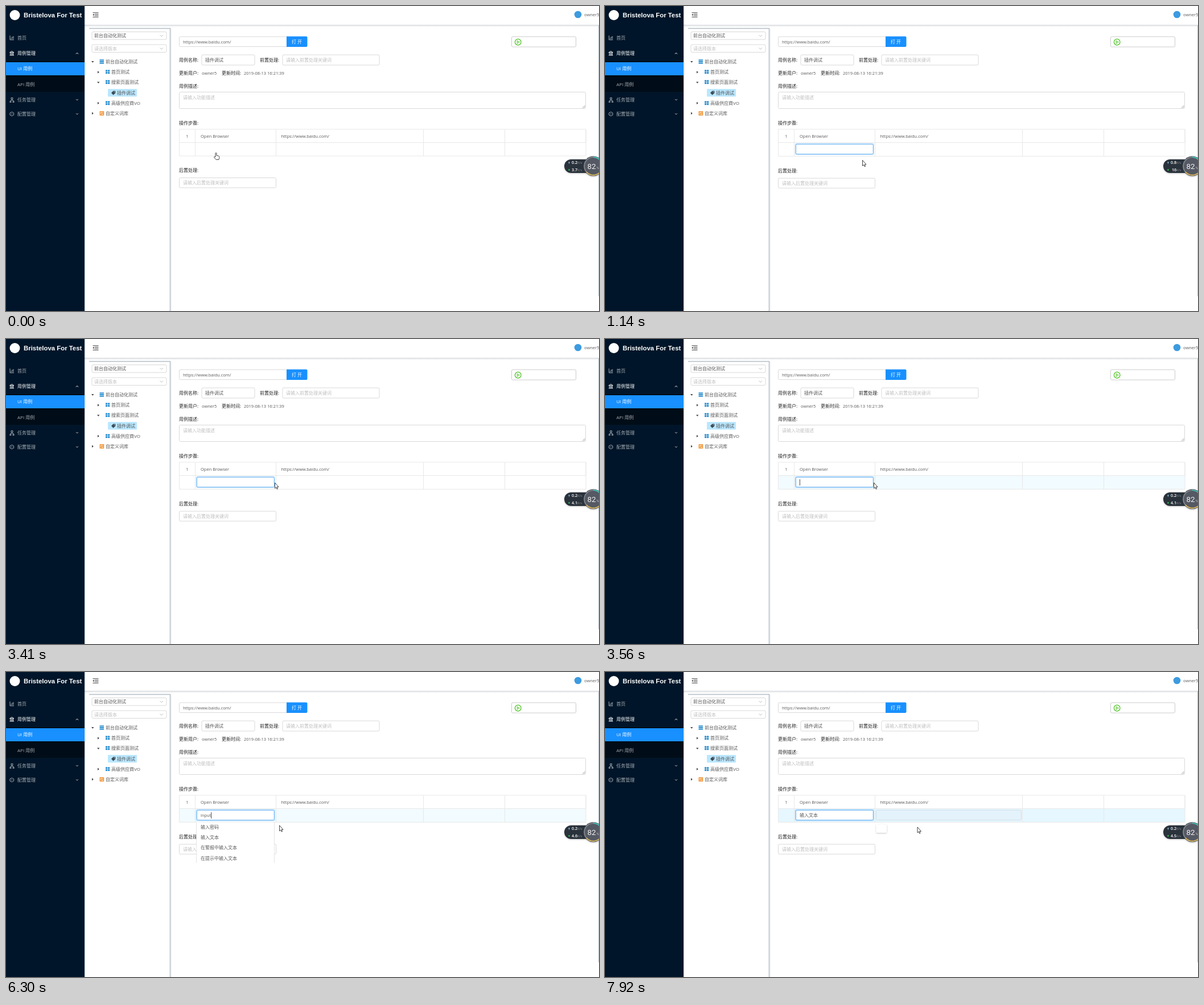
Animation, 1042 px wide and 537 px high, one loop 8000 ms. Source, as an HTML page:

```html
<!DOCTYPE html>
<html lang="zh">
<head>
<meta charset="utf-8">
<style>
html, body { margin: 0; width: 100%; height: 100%; overflow: hidden; background: #fff; }
svg { display: block; width: 100%; height: 100%; }
text { font: 8px "Open Sans", "Noto Sans CJK SC", "Noto Sans CJK", sans-serif; fill: #595959; white-space: pre; }
text.latin { font-size: 7.5px; }
text.label { fill: #262626; }
text.hint { fill: #bfbfbf; }
text.menu { fill: #a6adb4; }
text.lit { fill: #fff; }
text.strong { font-weight: 500; }
.box { fill: #fff; stroke: #d9d9d9; }
.grid { fill: none; stroke: #e8e8e8; }
.chevron { fill: none; stroke: #bfbfbf; }
.icon { fill: none; stroke: #a6adb4; }
</style>
</head>
<body>
<svg viewBox="0 0 1042 537">
  <defs>
    <filter id="shadow" x="-30%" y="-30%" width="160%" height="160%">
      <feDropShadow dx="0" dy="1" stdDeviation="1.6" flood-opacity=".22"/>
    </filter>
    <linearGradient id="fade" x2="0" y2="1">
      <stop stop-color="#00152b" stop-opacity=".16"/><stop offset="1" stop-color="#00152b" stop-opacity="0"/>
    </linearGradient>
  </defs>
  <rect width="1042" height="537" fill="#fff"/>

  <!-- header and panels -->
  <rect x="138" y="33" width="904" height="4" fill="url(#fade)"/>
  <path d="M152.500 11.700H162.500M156 14.300H162.500M156 16.800H162.500M152.500 19.400H162.500" stroke="#444"/>
  <path d="M154.800 13.500V17.600L152.300 15.500Z" fill="#444"/>
  <circle cx="1005" cy="15" r="6.300" fill="#3d9be0"/>
  <path d="M146 39.500H288.500V537" fill="none" stroke="#b4bdc5" stroke-width="1.500"/>
  <path d="M290.500 40V537" stroke="#eceff1"/>
  <path d="M1041.500 34V511" stroke="#b8bec4"/>

  <!-- sidebar -->
  <rect width="138" height="537" fill="#001529"/>
  <rect x="138" width="2" height="537" fill="#001529" opacity=".12"/>
  <rect y="97" width="138" height="54" fill="#000c17"/>
  <rect y="99" width="138" height="23" fill="#1890ff"/>
  <circle cx="15.500" cy="16" r="9" fill="#fff"/>
  <text x="31" y="20" style="font:bold 11.400px 'Liberation Sans',Arial,sans-serif;fill:#fff">Bristelova For Test</text>
  <path class="icon" d="M7 52V59.500H14M9 58V56M11 58V54M13 58V53"/>
  <path class="icon" style="stroke:#fff" d="M6.500 82L10.300 79.500 14 82ZM8 82.500V86M10.300 82.500V86M12.500 82.500V86M6.500 86.700H14"/>
  <path class="icon" stroke-width=".9" d="M9 161.500H12V164H9ZM10.500 164V166M8 168V166H13V168M6.800 168H9V169.500H6.800ZM12 168H14.200V169.500H12Z"/>
  <path class="icon" d="M10.300 186.500L13.600 188.300V191.800L10.300 193.600 7 191.800V188.300ZM9.300 190H11.300"/>
  <path class="chevron" style="stroke:#fff" d="M123 84.500L125 82.500 127 84.500"/>
  <path class="chevron" style="stroke:#a6adb4" d="M123 164L125 166 127 164M123 189L125 191 127 189"/>

  <!-- tree panel -->
  <rect class="box" x="151" y="45.500" width="131" height="13.500" rx="2"/>
  <rect class="box" x="151" y="68" width="131" height="13.500" rx="2"/>
  <path class="chevron" d="M270.500 51L273.300 53.800 276 51M270.500 73.500L273.300 76.300 276 73.500"/>
  <rect x="179" y="146" width="51" height="13.500" rx="1" fill="#bae7ff"/>
  <path d="M150 97H154.500L152.300 99.800ZM160 133.500H164.500L162.300 136.300ZM161 114.200L163.800 116.500 161 118.800ZM161 168.700L163.800 171 161 173.300ZM151 186.700L153.800 189 151 191.300Z" fill="#444"/>
  <path d="M164.500 95.300H172M164.500 98H172M164.500 100.700H172" stroke="#2b8fd0" stroke-width="2"/>
  <g id="blocks" fill="#2b8fd0"></g>
  <path d="M185 153L188.500 149.500H192.300V153.200L188.500 156.800Z" fill="#3c4a55"/>
  <circle cx="190.500" cy="151.300" r=".7" fill="#bae7ff"/>
  <path d="M165.300 186H171.500V192H165.300ZM167.500 188V192M167.500 188.500H170V190" fill="#fff3e0" stroke="#f09030" stroke-width="1.400"/>

  <!-- form -->
  <rect class="box" x="304.500" y="54" width="190" height="17.500" rx="2"/>
  <path d="M493 53.500H527.500Q529.500 53.500 529.500 55.500V70Q529.500 72 527.500 72H493Z" fill="#1890ff"/>
  <rect class="box" x="888.500" y="54" width="113" height="18" rx="2" style="stroke:#ccc"/>
  <circle cx="899.700" cy="63.500" r="5.300" fill="none" stroke="#45c01a" stroke-width="1.200"/>
  <path d="M898.200 61L902.300 63.500 898.200 66Z" fill="none" stroke="#45c01a"/>
  <rect class="box" x="344" y="86" width="93" height="18" rx="2"/>
  <rect class="box" x="486" y="86" width="170" height="18" rx="2"/>
  <rect class="box" x="304.500" y="151.500" width="714" height="29" rx="2"/>
  <path d="M1013 179.500L1017.500 175M1015.500 179.500L1017.500 177.500" stroke="#777" stroke-width=".7"/>

  <!-- step table -->
  <rect id="row" x="305" y="240.500" width="714" height="24"/>
  <path class="grid" d="M304.500 217H1019V240.500H304.500Z"/>
  <path class="grid" id="grid"/>
  <g id="after">
    <rect class="box" x="304.500" y="302.500" width="170" height="17.500" rx="2"/>
    <text class="label" x="304" y="292">后置处理:</text>
    <text class="hint" x="311" y="314">请输入后置处理关键词</text>
  </g>

  <!-- editing -->
  <g id="editor">
    <rect x="334.300" y="242.200" width="138" height="19.600" rx="2.500" fill="none" stroke="#1890ff" stroke-opacity=".18" stroke-width="1.500"/>
    <rect x="335.300" y="243.200" width="136" height="17.600" rx="2" fill="#fff" stroke="#57a9ee"/>
    <text id="typed" x="342" y="255.300"></text>
    <path id="caret" d="M0 247V258" stroke="#333" stroke-width=".9"/>
  </g>
  <g id="valueBox">
    <rect x="476.500" y="243.200" width="255" height="17.600" rx="2" fill="#e4f3fb" stroke="#cfdee6"/>
  </g>
  <g id="tip" filter="url(#shadow)">
    <path d="M478 268.500H484L486 266 488 268.500H493.500Q495 268.500 495 270V281.500Q495 283 493.500 283H478Q476.500 283 476.500 281.500V270Q476.500 268.500 478 268.500Z" fill="#fff"/>
  </g>
  <g id="menu">
    <rect x="334.500" y="264.500" width="137" height="72" fill="#fff"/>
    <path d="M334.500 265V336M471.500 265V336" stroke="#e4e4e4"/>
    <rect id="option" x="335" y="282" width="136" height="18" fill="#e6f7ff"/>
  </g>

  <!-- network gauge -->
  <g filter="url(#shadow)">
    <path d="M1032 270H993A12 12 0 0 0 993 294H1032Z" fill="#2c333b"/>
    <circle cx="1032" cy="282" r="17.500" fill="#41464f"/>
  </g>
  <circle cx="1032" cy="282" r="15.800" fill="#555963" stroke="#8b8e94" stroke-width="1.500"/>
  <path d="M1032 266.200A15.800 15.800 0 0 1 1046 275" fill="none" stroke="#3fc7bd" stroke-width="1.800"/>
  <path d="M1020 292.200A15.800 15.800 0 0 0 1042 294.200" fill="none" stroke="#d8b558" stroke-width="1.800"/>
  <path d="M989.500 278V274.500M988 276L989.500 274.300 991 276" fill="none" stroke="#7fb6d8" stroke-width=".9"/>
  <circle cx="989.500" cy="288.500" r="1.400" fill="#2fae4a"/>
  <text x="1021.500" y="286.500" style="font:13.500px Roboto,sans-serif;fill:#f2f2f2">82</text>
  <text x="1037.500" y="287" style="font:6px Roboto,sans-serif;fill:#ddd">%</text>
  <g id="speeds"></g>

  <g id="cursor" stroke="#333" stroke-width=".9" stroke-linejoin="round" fill="#fff">
    <path id="arrow" d="M.5 .5V10.500L2.700 8.500 4.100 11.800 5.600 11.200 4.200 8H7Z"/>
    <path id="hand" d="M3 8V1.500A1 1 0 0 1 5 1.500V5.200L8.500 6Q9.800 6.400 9.800 7.500V9.500L8.800 12.500H4.200L.7 8.600Q.5 7 1.800 7.200Z"/>
  </g>
</svg>
<script>
const $ = id => document.getElementById(id);
const svg = document.querySelector('svg');
const CYCLE = 8000;

function addText(parent, x, y, string, kind = '') {
  const node = document.createElementNS('http://www.w3.org/2000/svg', 'text');
  node.setAttribute('x', x);
  node.setAttribute('y', y);
  node.setAttribute('class', kind);
  node.textContent = string;
  parent.append(node);
  return node;
}

const captions = [
  [20, 59, '首页', 'menu'], [20, 86, '用例管理', 'lit strong'], [20, 113.3, 'UI 用例', 'lit strong'],
  [20, 140.5, 'API 用例', 'menu'], [20, 168, '任务管理', 'menu'], [20, 193, '配置管理', 'menu'],
  [1016, 17.6, 'owner5', 'latin'],
  [155, 55.3, '前台自动化测试'], [155, 77.7, '请选择版本', 'hint'],
  [175, 101, '前台自动化测试'], [185, 119, '首页测试'], [185, 137.3, '搜索页面测试'],
  [195, 155.7, '插件调试'], [185, 174, '高级供应商VO'], [175, 192, '自定义词库'],
  [311, 65.5, 'https://www.baidu.com/', 'latin'], [502, 66, '打 开', 'lit strong'],
  [304, 98.2, '用例名称:', 'label'], [350, 98.2, '插件调试'],
  [446, 98.2, '前置处理:', 'label'], [492, 98.2, '请输入前置处理关键词', 'hint'],
  [304, 121, '更新用户:', 'label'], [344, 120.7, 'owner5', 'latin'],
  [379, 121, '更新时间:', 'label'], [418, 120.7, '2019-08-13 16:21:39', 'latin'],
  [304, 143.5, '用例描述:', 'label'], [311, 163.5, '请输入功能描述', 'hint'],
  [304, 209, '操作步骤:', 'label'], [316.3, 231.7, '1', 'latin'],
  [342, 231.7, 'Open Browser', 'latin'], [483.5, 231.7, 'https://www.baidu.com/', 'latin']
];
for (const caption of captions) {
  const node = addText(svg, ...caption);
  svg.insertBefore(node, $('editor'));
}
['输入密码', '输入文本', '在警报中输入文本', '在提示中输入文本']
  .forEach((name, i) => addText($('menu'), 342, 276 + i * 18.2, name));

$('blocks').innerHTML = [116, 134, 171].map(y =>
  `<path d="M175 ${y - 3.5}h3.300v3h-3.300zm4 0h3.300v3h-3.300zm-4 3.700h3.300v3h-3.300zm4 0h3.300v3h-3.300z"/>`).join('');

const [upload, download] = [278.3, 290.8].map(y => {
  const value = addText($('speeds'), 1004, y, '');
  value.style.cssText = 'font:600 7px "Open Sans",sans-serif;fill:#fff;text-anchor:end';
  addText($('speeds'), 1004, y, 'K/s').style.cssText = 'font:5.800px "Open Sans",sans-serif;fill:#8d939a';
  return value;
});

// Timelines: each entry holds from its time until the next one.
const rowTint = [[0, 0], [150, 1], [290, .3], [580, 0], [3560, .5], [3710, 1], [6300, .5], [6420, 0],
  [7500, .5], [7640, 1]];
const pointer = [[0, 365, 258, 'hand'], [290, 452, 271], [2330, 459, 284], [2500, 466, 290], [2990, 468, 284],
  [3130, 471, 270], [3270, 472, 257], [3410, 472, 252.5], [6160, 477, 262], [6300, 480, 269.5],
  [6420, 462, 280], [6560, 425, 288], [6700, 398, 288], [6840, 385, 288], [7220, 440, 274],
  [7350, 498, 256, 'hand'], [7780, 530, 268], [7920, 548.5, 272.5]];
const typing = [[0, ''], [4270, 'i'], [4400, 'in'], [4530, 'inp'], [4930, 'inpu'], [5050, 'input'], [7080, '输入文本']];
const caretOn = [[0, 0], [580, 1], [1140, 0], [1570, 1], [2160, 0], [2680, 1], [3130, 0], [3560, 1],
  [5570, 0], [6020, 1], [6560, 0], [7080, 1], [7640, 0]];
const speed = [[0, '0.2', '3.7'], [720, '0.8', '16'], [1730, '0.4', '5.2'], [2680, '0.2', '4.1'],
  [3710, '0.4', '4.3'], [4660, '2.7', '5.6'], [5570, '0.2', '4.6'], [6560, '3.1', '6.2'], [7500, '0.2', '4.5']];

const at = (timeline, t) => timeline.findLast(entry => entry[0] <= t).slice(1);
const show = (id, on) => $(id).setAttribute('visibility', on ? 'inherit' : 'hidden');

function draw(t) {
  const editing = t >= 580;
  const bottom = editing ? 264.5 : 264;
  $('grid').setAttribute('d', `M304.500 217V${bottom}H1019V217M332.500 217V${bottom}M474.500 217V${bottom}M733.500 217V${bottom}M876.500 217V${bottom}`);
  $('after').setAttribute('transform', `translate(0 ${editing ? .7 : 0})`);
  $('row').setAttribute('fill', `rgba(230,247,255,${at(rowTint, t)[0]})`);

  show('editor', editing);
  show('valueBox', t >= 7640);
  show('tip', t >= 7640);
  show('menu', t >= 5880 && t < 7080);
  show('option', t >= 6560 && t < 7080);

  const [word] = at(typing, t);
  $('typed').textContent = word;
  $('typed').setAttribute('class', t < 7080 ? 'latin' : '');
  const caretX = 342.4 + (word ? $('typed').getComputedTextLength() : 0);
  $('caret').setAttribute('transform', `translate(${caretX} 0)`);
  show('caret', editing && at(caretOn, t)[0]);

  [upload.textContent, download.textContent] = at(speed, t);

  const [x, y, shape = 'arrow'] = at(pointer, t);
  $('cursor').setAttribute('transform', `translate(${x} ${y})`);
  show('arrow', shape === 'arrow');
  show('hand', shape === 'hand');
}

function tick() {
  draw(performance.now() % CYCLE);
  requestAnimationFrame(tick);
}
tick();
</script>
</body>
</html>
```
